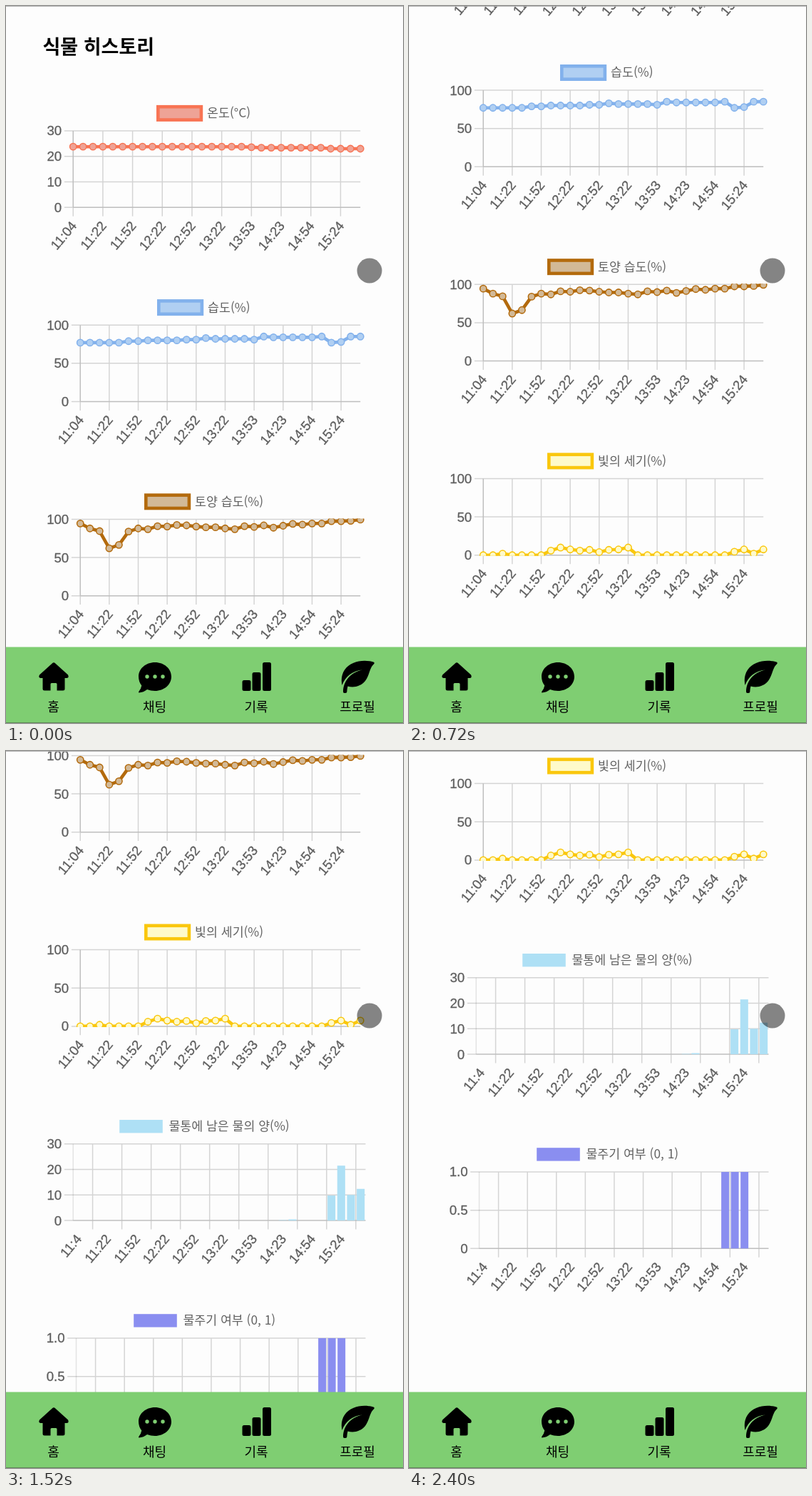
An HTML page for the animation above (2.48 s loop, 557 px wide and 1005 px high).

```html
<!DOCTYPE html>
<html lang="ko">
<head>
<meta charset="utf-8">
<title>식물 히스토리</title>
<style>
html, body { margin: 0; width: 100%; height: 100%; overflow: hidden; background: #fdfdfd; }
svg { display: block; width: 557px; height: 1005px; }
text { font-family: "Noto Sans CJK KR", "Noto Sans CJK", sans-serif; }
.title { font-size: 27px; font-weight: 700; }
.legend { font-size: 17.3px; font-weight: 500; fill: #626262; }
.tick { font: 18.57px "Liberation Sans", Arial, sans-serif; fill: #5e5e5e; stroke: #5e5e5e; stroke-width: .3; text-anchor: end; }
.grid { stroke: #000; stroke-opacity: .16; stroke-width: 1.5; fill: none; }
.axis { stroke-opacity: .1; }
.nav text { font-size: 18px; font-weight: 500; text-anchor: middle; }
</style>
</head>
<body>
<svg viewBox="0 0 557 1005">
  <defs id="defs"></defs>
  <g id="page">
    <text class="title" x="51.5" y="67">식물 히스토리</text>
  </g>
  <rect width="557" height="1" fill="#b4b4b4"/>
  <g class="nav">
    <rect y="898.5" width="557" height="106.5" fill="#7fce72"/>
    <rect y="1004" width="557" height="1" fill="#5f8a58"/>
    <path d="M65 921.200Q67 919.500 69 921.200L87 937.600Q88.800 941.800 85.500 942H82.500V957Q82.500 959.500 80 959.500H71.500V950.500Q71.500 949 70 949H64Q62.500 949 62.500 950.500V959.500H54Q51.500 959.500 51.500 957V942H48.500Q45 941.800 47 937.600Z"/>
    <path d="M209 920C222 920 232 929 232 940S222 960 209 960Q203 960 198 958Q193 962 186.500 962.500Q185.500 962 186.300 961Q189.500 957 190.300 952.500Q186 947 186 940C186 929 196 920 209 920Z"/>
    <g fill="#7fce72"><circle cx="198" cy="940" r="2.700"/><circle cx="209" cy="940" r="2.700"/><circle cx="220" cy="940" r="2.700"/></g>
    <rect x="331.500" y="945" width="12" height="15" rx="2.500"/>
    <rect x="345.500" y="934" width="12" height="26" rx="2.500"/>
    <rect x="360" y="920" width="12" height="40" rx="2.500"/>
    <path d="M471.500 952C468.500 938 475 926 487 921C496 917 507 917 515.500 919.500Q518 920.500 515.500 923C510 928 510 938 504 946C498 953.500 488 956 479.500 953.500Q478.500 957 478.300 961.500Q478 963 476 963H474.500Q473 963 473 961C473 947 483 934 500 930.500C486 932 476 940 471.500 952Z"/>
    <text x="66.500" y="989.300">홈</text>
    <text x="208.500" y="989.300">채팅</text>
    <text x="351" y="989.300">기록</text>
    <text x="493" y="989.300">프로필</text>
  </g>
  <circle cx="510" cy="371" r="17.500" fill="#000" fill-opacity=".48"/>
</svg>
<script>
const HEIGHT = 107.3, PITCH = 272.2, FIRST_TOP = 175, COUNT = 30, TICK = 12.4;
const page = document.getElementById('page');
const defs = document.getElementById('defs');
const rep = (value, n) => Array(n).fill(value);
const times = ['11:04', '11:22', '11:52', '12:22', '12:52', '13:22', '13:53', '14:23', '14:54', '15:24'];

const charts = [
  { name: '온도(°C)', key: 213.3, left: 94.2, ticks: ['0', '10', '20', '30'], max: 30,
    stroke: '#f87454', fill: '#eea396',
    data: [...rep(23.8, 18), 23.6, ...rep(23.4, 7), ...rep(23, 4)] },
  { name: '습도(%)', key: 214.3, left: 104.2, ticks: ['0', '50', '100'], max: 100,
    stroke: '#82b1ec', fill: '#b0cff2',
    data: [...rep(77, 5), 79, 79, ...rep(80, 4), 81, 81, 83, ...rep(82, 4), 81, 85, ...rep(84, 5), 85, 77, 78, 85, 85] },
  { name: '토양 습도(%)', key: 196.3, left: 104.2, ticks: ['0', '50', '100'], max: 100,
    stroke: '#b36a0c', fill: '#d2b997',
    data: [94.5, 88, 84.5, 62, 66.5, 84, 88, 87, 91, 90.5, 92.5, 92, 90.5, 89.5, 89.5,
      88, 87, 91, 90, 92, 89, 91.5, 94, 93, 94.5, 94.5, 97.5, 97.5, 98, 99.5] },
  { name: '빛의 세기(%)', key: 196.3, left: 104.2, ticks: ['0', '50', '100'], max: 100,
    stroke: '#fac70d', fill: '#fefaca',
    data: [0, 0, 2, 0, 0, 0, 0, 6, 10, 7.5, 6, 7, 4, 7, 7.5, 10, ...rep(0, 10), 4.5, 7.5, 2, 7.5] },
  { name: '물통에 남은 물의 양(%)', key: 159.2, left: 94.2, ticks: ['0', '10', '20', '30'], max: 30, bars: true,
    fill: '#aee0f5', data: [...rep(0, 21), .15, .45, 0, 0, 0, 9.8, 21.5, 10, 12.4] },
  { name: '물주기 여부 (0, 1)', key: 179.2, left: 98.5, ticks: ['0', '0.5', '1.0'], max: 1, bars: true,
    fill: '#8a8ef0', data: [...rep(0, 25), 1, 1, 1, 0, 0] }
];

const line = (x1, y1, x2, y2) => `M${x1} ${y1}L${x2} ${y2}`;

function drawChart(c, index) {
  const top = FIRST_TOP + index * PITCH, bottom = top + HEIGHT;
  const right = c.bars ? 504.5 : 497.2;
  const step = (right - c.left) / (c.bars ? COUNT : COUNT - 1);
  const y = v => bottom - v / c.max * HEIGHT;
  const x = i => c.left + step * (c.bars ? i + .5 : i);
  let grid = '', svg = '';

  c.ticks.forEach((label, i) => {
    const ty = bottom - HEIGHT * i / (c.ticks.length - 1);
    grid += line(c.left - TICK, ty, right, ty);
    svg += `<text class="tick" x="${c.left - 16}" y="${ty}" dy=".35em">${label}</text>`;
  });
  times.forEach((time, i) => {
    const gx = x(i * 3 + (c.bars ? 1.5 : 0));
    grid += line(gx, top, gx, bottom + TICK);
    const label = c.bars && !i ? '11:4' : time;
    svg += `<text class="tick" transform="translate(${x(i * 3) + 1} ${bottom + 22}) rotate(-50)" dy=".35em">${label}</text>`;
  });
  svg += `<path class="grid" d="${grid}"/>`;
  svg += `<path class="grid axis" d="${line(c.left, top, c.left, bottom)}${line(c.left, bottom, right, bottom)}"/>`;

  const border = c.bars ? '' : `stroke="${c.stroke}" stroke-width="4.6"`;
  svg += `<rect x="${c.key}" y="${top - 33.8}" width="60.6" height="18.4" fill="${c.fill}" ${border}/>`;
  svg += `<text class="legend" x="${c.key + (c.bars ? 69.2 : 68.8)}" y="${top - 18.6}">${c.name}</text>`;

  if (c.bars) {
    c.data.forEach((v, i) => {
      if (v) svg += `<rect x="${x(i) - step * .405}" y="${y(v)}" width="${step * .81}" height="${bottom - y(v)}" fill="${c.fill}"/>`;
    });
  } else {
    defs.innerHTML += `<clipPath id="area${index}"><rect x="${c.left - 8}" y="${top - 1}" width="${right - c.left + 16}" height="${HEIGHT + 2}"/></clipPath>`;
    const points = c.data.map((v, i) => [x(i), y(v)]);
    svg += `<g clip-path="url(#area${index})" stroke="${c.stroke}">`
      + `<polyline points="${points.join(' ')}" fill="none" stroke-width="4.6" stroke-linejoin="round"/>`
      + points.map(([px, py]) => `<circle cx="${px}" cy="${py}" r="4.65" fill="${c.fill}" stroke-width="1.55"/>`).join('')
      + '</g>';
  }
  page.innerHTML += svg;
}
charts.forEach(drawChart);

// Scroll path: [ms, px], joined by a smooth curve and shown in 80 ms steps.
const LOOP = 2480, HOLD = 80;
const stops = [[0, 0], [480, 210], [880, 404.5], [1200, 517], [1520, 713], [1840, 800], [2300, 946]];
const slopes = stops.map((s, i) => {
  if (!i) return .36;
  if (i === stops.length - 1) return 0;
  const [a, b] = [stops[i - 1], stops[i + 1]];
  return (b[1] - a[1]) / (b[0] - a[0]);
});

function scrollAt(t) {
  const i = stops.findIndex(s => s[0] > t) - 1;
  if (i < 0) return stops[stops.length - 1][1];
  const [t0, p0] = stops[i], [t1, p1] = stops[i + 1];
  const d = t1 - t0, u = (t - t0) / d, v = 1 - u;
  return v * v * ((1 + 2 * u) * p0 + u * d * slopes[i])
    + u * u * ((3 - 2 * u) * p1 - v * d * slopes[i + 1]);
}

const start = performance.now();
function frame() {
  const t = (performance.now() - start) % LOOP;
  const y = scrollAt(Math.floor(t / HOLD) * HOLD);
  page.setAttribute('transform', `translate(0 ${-y.toFixed(2)})`);
  requestAnimationFrame(frame);
}
frame();
</script>
</body>
</html>
```
